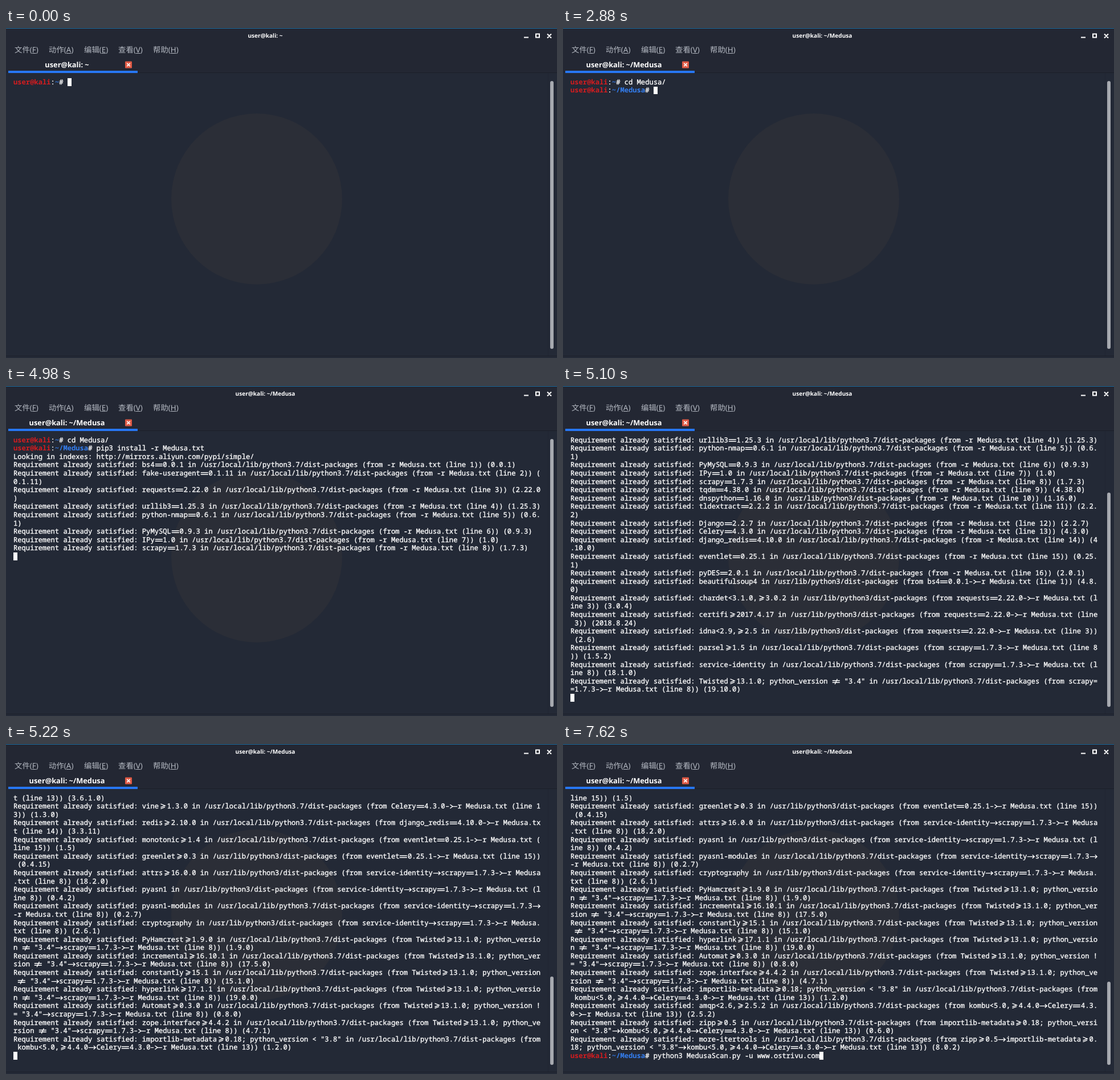
Animation, 967 px wide and 579 px high, one loop 8000 ms. Source, as an HTML page:

```html
<!DOCTYPE html>
<html lang="zh">
<head>
<meta charset="utf-8">
<title>Terminal</title>
<style>
html, body { margin: 0; width: 100%; height: 100%; overflow: hidden; }
body { position: relative; background: #232936; color: #fff; text-rendering: geometricPrecision;
  font-family: "Noto Sans", "Noto Sans CJK SC", "Noto Sans CJK", sans-serif; }
body > * { position: absolute; }
#head { left: 0; top: 0; width: 967px; height: 78px; background: #232733;
  border-top: 1px solid #1d6e9f; box-sizing: border-box; }
#rule { left: 231px; top: 78px; width: 736px; height: 1px; background: #1c202a; }
#edge { left: 951px; top: 79px; width: 1px; height: 497px; background: #202531; }
#foot { left: 0; top: 575px; width: 967px; height: 1px; background: #1c202a; }
#title, #tab { font-weight: 700; text-align: center; white-space: pre; }
#title { left: 355px; top: 6px; width: 200px; font-size: 10.1px; line-height: 15px; }
#tab { left: 7px; top: 55px; width: 200px; font-size: 12.8px; line-height: 19px; }
#line { left: 4px; top: 75px; width: 227px; height: 4px; background: #2777f5; }
.menu { top: 28px; font-size: 13.4px; line-height: 20px; color: #b4b9c2; white-space: nowrap; }
#mark { left: 290px; top: 150px; width: 300px; height: 300px; border-radius: 50%; background: #2b2e37; }
#icons { left: 0; top: 0; }
#term { left: 13px; top: 87.6px; margin: 0; white-space: pre; font-weight: 500; -webkit-text-stroke: .35px;
  font-size: 12.15px; line-height: 14.6px; font-family: "Noto Sans Mono", "DejaVu Sans Mono", monospace; }
#term svg { vertical-align: top; height: 14.6px; fill: none; stroke: #fff; stroke-width: 1.4; }
#term b { -webkit-text-stroke: 0; }
#term .user { color: #d51c1f; }
#term .dir { color: #347ff2; }
#cursor { display: inline-block; vertical-align: top; width: 7.4px; height: 13.6px; margin-top: .4px; background: #fff; }
#bar { left: 955px; width: 5.5px; border-radius: 3px; background: #a6a9af; }
</style>
</head>
<body>
<div id="head"></div><div id="rule"></div><div id="edge"></div><div id="foot"></div>
<div id="mark"></div>
<div id="title"></div>
<div class="menu" style="left:15px">文件(<u>F</u>)</div>
<div class="menu" style="left:75px">动作(<u>A</u>)</div>
<div class="menu" style="left:137px">编辑(<u>E</u>)</div>
<div class="menu" style="left:197px">查看(<u>V</u>)</div>
<div class="menu" style="left:258px">帮助(<u>H</u>)</div>
<div id="tab"></div><div id="line"></div>
<svg id="icons" width="967" height="79" fill="none" stroke="#fff" stroke-width="2">
  <path d="M909 16.5h8M930 10.5h6v6h-6zM950 10.5l7 7m0-7l-7 7"/>
  <rect x="209" y="58.5" width="12" height="12" rx="1" fill="#df5a45" stroke="none"/>
  <path d="M212.3 61.8l5.4 5.4m0-5.4l-5.4 5.4" stroke-width="1.7"/>
</svg>
<pre id="term"></pre>
<div id="bar"></div>
<script>
const LOOP = 8000, COLS = 127, ROWS = 32, CELL = 7.29;
const $ = id => document.getElementById(id);

const req = 'requests==2.22.0->', scrapy = 'scrapy==1.7.3->', celery = 'Celery==4.3.0->';
const ident = 'service-identity->' + scrapy;
const twisted = 'Twisted>=13.1.0; python_version != "3.4"';
const tw = twisted + '->' + scrapy;
const kombu = 'kombu<5.0,>=4.4.0', kc = kombu + '->' + celery;
const meta = 'importlib-metadata>=0.18; python_version < "3.8"', mk = meta + '->' + kc;

// package | L local or S system path | required by | line | version
const packages = `bs4==0.0.1|L||1|0.0.1
fake-useragent==0.1.11|L||2|0.1.11
requests==2.22.0|L||3|2.22.0
urllib3==1.25.3|L||4|1.25.3
python-nmap==0.6.1|L||5|0.6.1
PyMySQL==0.9.3|L||6|0.9.3
IPy==1.0|L||7|1.0
scrapy==1.7.3|L||8|1.7.3
tqdm==4.38.0|L||9|4.38.0
dnspython==1.16.0|S||10|1.16.0
tldextract==2.2.2|L||11|2.2.2
Django==2.2.7|L||12|2.2.7
Celery==4.3.0|L||13|4.3.0
django_redis==4.10.0|L||14|4.10.0
eventlet==0.25.1|L||15|0.25.1
pyDES==2.0.1|L||16|2.0.1
beautifulsoup4|S|bs4==0.0.1->|1|4.8.0
chardet<3.1.0,>=3.0.2|S|${req}|3|3.0.4
certifi>=2017.4.17|S|${req}|3|2018.8.24
idna<2.9,>=2.5|S|${req}|3|2.6
parsel>=1.5|L|${scrapy}|8|1.5.2
service-identity|L|${scrapy}|8|18.1.0
${twisted}|L|${scrapy}|8|19.10.0
w3lib>=1.17.0|L|${scrapy}|8|1.21.0
lxml|S|${scrapy}|8|4.4.1
PyDispatcher>=2.0.5|L|${scrapy}|8|2.0.5
cssselect>=0.9|S|${scrapy}|8|1.1.0
queuelib|L|${scrapy}|8|1.5.0
pyOpenSSL|L|${scrapy}|8|19.0.0
six>=1.5.2|S|${scrapy}|8|1.12.0
requests-file>=1.4|L|tldextract==2.2.2->|11|1.4.3
setuptools|S|tldextract==2.2.2->|11|41.2.0
sqlparse|L|Django==2.2.7->|12|0.3.0
pytz|L|Django==2.2.7->|12|2019.3
soupsieve>=1.2|S|beautifulsoup4->bs4==0.0.1->|1|1.9.3
${kombu}|L|${celery}|13|4.6.6
billiard<4.0,>=3.6.0|L|${celery}|13|3.6.1.0
vine>=1.3.0|L|${celery}|13|1.3.0
redis>=2.10.0|L|django_redis==4.10.0->|14|3.3.11
monotonic>=1.4|L|eventlet==0.25.1->|15|1.5
greenlet>=0.3|S|eventlet==0.25.1->|15|0.4.15
attrs>=16.0.0|S|${ident}|8|18.2.0
pyasn1|S|${ident}|8|0.4.2
pyasn1-modules|L|${ident}|8|0.2.7
cryptography|S|${ident}|8|2.6.1
PyHamcrest>=1.9.0|L|${tw}|8|1.9.0
incremental>=16.10.1|L|${tw}|8|17.5.0
constantly>=15.1|L|${tw}|8|15.1.0
hyperlink>=17.1.1|L|${tw}|8|19.0.0
Automat>=0.3.0|L|${tw}|8|0.8.0
zope.interface>=4.4.2|L|${tw}|8|4.7.1
${meta}|L|${kc}|13|1.2.0
amqp<2.6,>=2.5.2|L|${kc}|13|2.5.2
zipp>=0.5|L|${mk}|13|0.6.0
more-itertools|L|zipp>=0.5->${mk}|13|8.0.2`;

// Ligatures, drawn across as many cells as they have characters
const shapes = {
  '==': 'M.8 6h13M.8 9.3h13',
  '>=': 'M3.5 3.2l7.6 3-7.6 3M3.5 11.6l7.6-3',
  '!=': 'M.8 6h13M.8 9.3h13M9.4 3L5.2 12.3',
  '->': 'M.8 7.6h12.4M9.8 4.4l3.4 3.2-3.4 3.2',
  '->-': 'M1.2 7.6h4.9M8.4 4.2l4.6 3.4-4.6 3.4M13 7.6h8'
};
const escapes = { '<': '&lt;', '>': '&gt;' };
const glyph = s => {
  const width = CELL * s.length;
  return `<svg style="width:${width}px" viewBox="0 0 ${width} 14.6"><path d="${shapes[s]}"/></svg>`;
};
const markup = row => row.replace(/->-|->|==|>=|!=|[<>]/g, s => escapes[s] || glyph(s));

const log = packages.split('\n').map(entry => {
  const [spec, place, parent, line, version] = entry.split('|');
  const path = place === 'L' ? '/usr/local/lib/python3.7' : '/usr/lib/python3';
  const text = `Requirement already satisfied: ${spec} in ${path}/dist-packages` +
    ` (from ${parent}-r Medusa.txt (line ${line})) (${version})`;
  return text.match(new RegExp(`.{1,${COLS}}`, 'g')).map(markup);
});

const typing = [[0, ''], [720, 'c'], [750, 'cd'], [1080, 'cd '], [1470, 'cd M'], [2160, 'cd Me'], [2400, 'cd Medusa/']];
const progress = [[4980, 8], [5010, 16], [5100, 23], [5160, 37], [5220, 52], [5250, 55]];
const latest = (list, t) => list.filter(([at]) => at <= t).pop()[1];
const prompt = dir => `<b class="user">user@kali</b>:<b class="dir">${dir}</b># `;

function rowsAt(t) {
  const home = prompt('~/Medusa');
  const rows = [prompt('~') + latest(typing, t)];
  if (t >= 2850) rows.push(home + (t >= 4020 ? 'pip3 install -r Medusa.txt' : ''));
  if (t >= 4980) {
    rows.push('Looking in indexes: http://mirrors.aliyun.com/pypi/simple/',
      ...log.slice(0, latest(progress, t)).flat());
  }
  if (t >= 5400) rows.push(home + (t >= 7620 ? 'python3 MedusaScan.py -u www.ostrivu.com' : ''));
  else if (t >= 4020) rows.push('');
  return rows;
}

const changes = [...typing, ...progress, [2850], [2880], [4020], [5400], [7620]].map(([at]) => at);
let shown = -1;

function draw(now) {
  const t = now % LOOP;
  const step = Math.max(...changes.filter(at => at <= t));
  if (step !== shown) {
    shown = step;
    const rows = rowsAt(t);
    $('term').innerHTML = rows.slice(-ROWS).join('\n') + '<span id="cursor"></span>';
    $('title').textContent = $('tab').textContent = 'user@kali: ~' + (t >= 2880 ? '/Medusa' : '');
    const height = 470 * Math.min(1, ROWS / rows.length);
    $('bar').style.height = height + 'px';
    $('bar').style.top = 563 - height + 'px';
  }
}

const start = performance.now();
function tick() {
  draw(performance.now() - start);
  requestAnimationFrame(tick);
}
tick();
</script>
</body>
</html>
```
